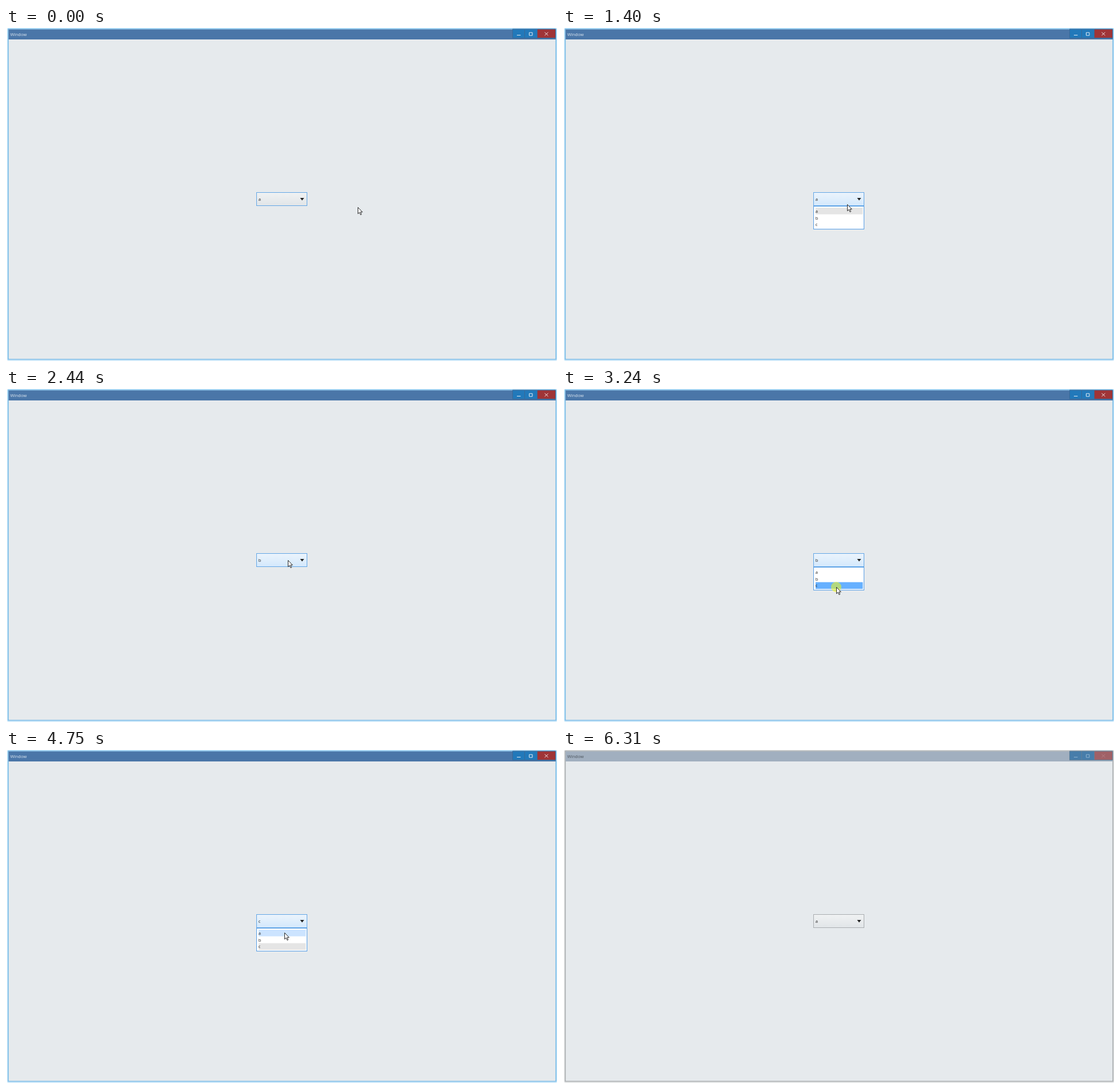
An HTML page that plays this animation: 962x582 px, repeating every 6470 ms.

```html
<!DOCTYPE html>
<html lang="en">
<head>
<meta charset="utf-8">
<title>Combo box</title>
<style>
  html, body { margin: 0; width: 100%; height: 100%; overflow: hidden; background: #fff; }
  svg { display: block; width: 962px; height: 582px; font: 7.6px "Open Sans", "Noto Sans", sans-serif; }
  #win { --edge: #4fa6e2; --glow: #bfe2f7; --bar: #4a76a8; --title: #dfe8f1; --rim: #3a6896;
         --btn: #2279ba; --close: #9f3437; --icon: #e4edf5; --cross: #f0e0e2; --line: #62a6e6; }
  #win.idle { --edge: #8b8f92; --glow: #dcdedf; --bar: #a1afbf; --title: #4b535c; --rim: #5f7f99;
              --btn: #477daa; --close: #a06167; --icon: #8fb3d0; --cross: #b47d83; --line: #a9adb0; }
  .label { fill: #222; }
</style>
</head>
<body>
<svg viewBox="0 0 962 582">
  <defs>
    <linearGradient id="plain" x2="0" y2="1"><stop stop-color="#f0f2f3"/><stop offset="1" stop-color="#e1e5e8"/></linearGradient>
    <linearGradient id="hot" x2="0" y2="1"><stop stop-color="#ecf4fc"/><stop offset="1" stop-color="#d3e8fc"/></linearGradient>
    <clipPath id="reveal"><rect id="slide" x="437" y="310" width="90" height="43"/></clipPath>
  </defs>
  <g id="win">
    <rect x="3" y="1" width="958" height="579.5" rx="1" fill="none" stroke="var(--glow)" stroke-width="2"/>
    <rect x="4" y="2" width="956" height="577" fill="#e6eaed" stroke="var(--edge)"/>
    <rect x="4.5" y="2.5" width="955.5" height="17.5" fill="var(--bar)"/>
    <text x="7.5" y="14" fill="var(--title)">Window</text>
    <g stroke="var(--rim)">
      <path d="M884.5 2h21v15.5h-21zM905.5 2h22v15.5h-22z" fill="var(--btn)"/>
      <path d="M927.5 2h32v15.5h-32z" fill="var(--close)"/>
    </g>
    <g fill="none" stroke="var(--icon)">
      <path d="M892 12.5h6.5M913.5 8h5.5v5h-5.5z"/>
      <path d="M940.5 7.5l6 5.5m0-5.5l-6 5.5" stroke="var(--cross)"/>
    </g>
    <rect id="box" x="437.5" y="287.5" width="88" height="23" stroke="var(--line)"/>
    <text id="value" class="label" x="440.7" y="302"></text>
    <path d="M513.5 297h7l-3.5 4.5z" fill="#222"/>
    <g id="popup" clip-path="url(#reveal)">
      <rect x="437.5" y="311.5" width="88" height="40" fill="#fff" stroke="#569de5"/>
      <g id="rows"></g>
    </g>
  </g>
  <circle id="click" r="9" fill="#ff0" fill-opacity=".5"/>
  <path id="cursor" d="M.5.5V11.7L3.1 9.3l1.9 4.2 1.7-.8L4.9 8.7H8.3z" fill="#fff" stroke="#111" stroke-width=".9"/>
</svg>
<script>
const LOOP = 6470, STEP = 79.15, FIRST = 380, LETTERS = "abc";
const ROW_TOP = 314, ROW_H = 11.8;
const HOLD = 120;   // how long a click stays pressed
const REST = 240;   // the pointer arrives this long before a release
const PAUSE = 80;   // and waits this long after it
const SLIDE = 200;  // popup opening
const $ = id => document.getElementById(id);

// stops of the pointer: the end of each one's click, except at the start and the exit
const stops = [
  { end: 220, x: 614, y: 313 },
  { end: 1250, x: 504, y: 297 },
  { end: 2200, x: 480, y: 330 },
  { end: 2760, x: 492, y: 298 },
  { end: 3320, x: 477, y: 346 },
  { end: 4430, x: 497, y: 297 },
  { end: 5220, x: 484, y: 323 },
  { end: 5850, x: 937, y: 569 }
];
const clicks = stops.slice(1, -1), exit = stops[stops.length - 1];

const rows = [...LETTERS].map((letter, i) => {
  const y = ROW_TOP + i * ROW_H;
  $("rows").insertAdjacentHTML("beforeend",
    `<rect x="441" y="${y}" width="82.5" height="${ROW_H}"/>` +
    `<text class="label" x="440.7" y="${y + 8.7}">${letter}</text>`);
  return $("rows").querySelectorAll("rect")[i];
});

const rowAt = y => Math.floor((y - ROW_TOP) / ROW_H);

function pointer(t) {
  const to = stops.find((s, i) => i && s.end > t) || exit;
  const from = stops[stops.indexOf(to) - 1], leave = from.end + PAUSE;
  const p = Math.min(1, Math.max(0, (t - leave) / (to.end - REST - leave)));
  const e = 1 - (1 - p) ** 3;
  return [from.x + (to.x - from.x) * e, from.y + (to.y - from.y) * e].map(Math.round);
}

// odd clicks open the popup, even ones pick a row
function combo(t) {
  const done = clicks.filter(c => c.end <= t);
  const pick = done.filter((c, i) => i % 2).pop();
  return {
    chosen: pick ? rowAt(pick.y) : 0,
    openedAt: done.length % 2 ? done.pop().end : null,
    press: clicks.some(c => t >= c.end - HOLD && t < c.end)
  };
}

const show = (id, on) => $(id).style.display = on ? "" : "none";

function draw(t) {
  const tick = FIRST + Math.floor((t - FIRST + 10) / STEP) * STEP;
  const [x, y] = pointer(tick);
  const { chosen, openedAt, press } = combo(t);
  const open = openedAt !== null;
  const over = x >= 438 && x < 526 && y >= 288 && y < 311;

  $("win").classList.toggle("idle", t >= 6310);
  $("box").setAttribute("fill", open || over ? "url(#hot)" : "url(#plain)");
  $("value").textContent = LETTERS[chosen];

  show("popup", open);
  if (open) {
    $("slide").setAttribute("height", 43 * Math.min(1, (t - openedAt + STEP) / SLIDE));
    rows.forEach((row, i) => row.setAttribute("fill",
      i === rowAt(y) ? (press ? "#66b0ff" : "#cce4ff") :
      i === chosen && !press ? "#e5e5e5" : "#fff"));
  }

  show("click", press);
  show("cursor", t < exit.end);
  for (const id of ["click", "cursor"]) $(id).setAttribute("transform", `translate(${x} ${y})`);
}

const begin = performance.now();
function frame() {
  draw((performance.now() - begin) % LOOP);
  requestAnimationFrame(frame);
}
frame();
</script>
</body>
</html>
```
